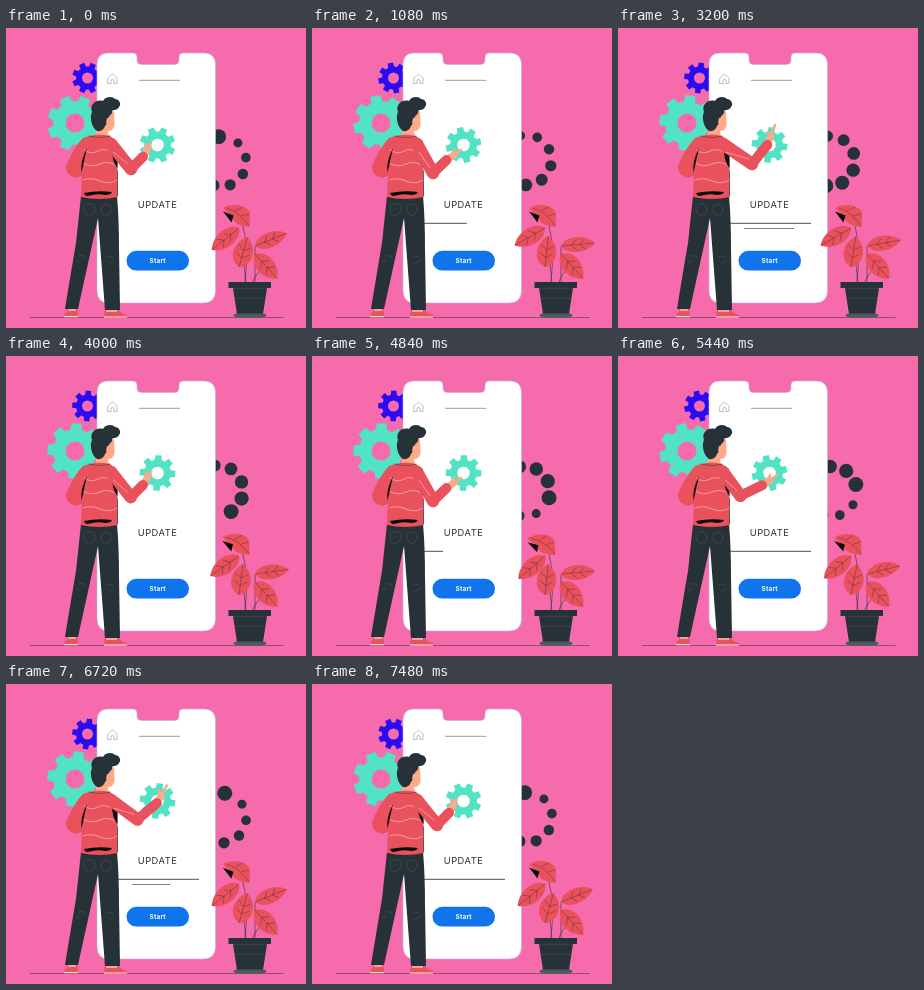
An HTML page that plays this animation: 300 px wide and 300 px high, repeating every 7720 ms.

```html
<!DOCTYPE html>
<html lang="en">
<head>
<meta charset="utf-8">
<title>Update</title>
<style>
html, body { margin: 0; height: 100%; overflow: hidden; background: #f56bab }
svg { display: block; width: 100vw; height: 100vh }
text { font-family: Inter, "Open Sans", sans-serif; text-anchor: middle }
.red { fill: #e9525c }
.dark { fill: #263238 }
.black { fill: #0b0d0e }
.skin { fill: #ffa988 }
.mint { fill: #52e3c4 }
.line { fill: none; stroke: #263238; stroke-linecap: round; stroke-linejoin: round }
.vein { fill: none; stroke: #5b2b38; stroke-width: .45 }
.sleeve { fill: none; stroke: #e9525c; stroke-linecap: round; stroke-linejoin: round }
.hand { fill: none; stroke: #ffa988; stroke-linecap: round; stroke-linejoin: round }
.stripe { fill: none; stroke: #f8b9bb; stroke-width: .7 }
</style>
</head>
<body>
<svg viewBox="0 0 300 300">
  <path id="blueGear" fill="#2b0cf2"/>
  <path id="bigGear" class="mint"/>
  <g id="ring" class="dark"></g>

  <path fill="#fff" stroke="#b9b4ef" stroke-width=".6" d="M102 25H127Q131 25 131 29V32Q131 36.500 136 36.500H168Q173 36.500 173 32V29Q173 25 177 25H198Q209.500 25 209.500 37V262Q209.500 275 197 275H103Q91 275 91 262V37Q91 25 102 25Z"/>
  <path class="line" stroke-width=".6" opacity=".5" d="M102 50L106.500 46L111 50V55.500H108V52Q106.500 50 105 52V55.500H102Z"/>
  <path stroke="#9c9fa1" d="M133 52.300H174"/>
  <path id="phoneGear" class="mint"/>
  <text x="151.500" y="179.700" font-size="9.300" letter-spacing=".5" fill="#263238">UPDATE</text>
  <rect x="120.500" y="222.800" width="62.500" height="19.700" rx="9.800" fill="#1074ec"/>
  <text x="151.700" y="234.800" font-size="6.300" letter-spacing=".25" font-weight="700" fill="#fff">Start</text>
  <path id="rule1" stroke="#4a5459"/>
  <path id="rule2" stroke="#6b7478" stroke-width=".9"/>

  <path class="line" stroke-width=".7" opacity=".7" d="M24 289.500H277"/>

  <!-- plant -->
  <path class="line" stroke-width=".7" opacity=".8" d="M240 256L238 236M249 256L249 219M246 256Q250 245 258 238M239 254Q243 220 237 198"/>
  <g id="leaves"></g>
  <g id="topLeaf">
    <path class="red" d="M217.500 180C224 175 241 176 244 185L243.500 199C235 198 229 196 226 190Z"/>
    <path class="black" d="M217 183.500L227.500 187.500L225.500 194.500Z"/>
    <path class="vein" d="M221 180Q234 184 243 198M229 183L237 179M235 188L243 186"/>
  </g>
  <path class="dark" d="M222.500 254H265V260H261L257 286H231L227 260H222.500Z"/>
  <path fill="#4c5a61" d="M230 285.500H258L261 287L258 289.500H230L227 287Z"/>
  <path fill="none" stroke="#48555c" stroke-width=".6" d="M227 260.300H261M229 270H259"/>

  <!-- person -->
  <path class="red" d="M61 280H71L72 289H58Q58 285 61 284ZM99 281H112Q115 286 121 287V289.500H98Z"/>
  <path stroke="#fff" stroke-width=".9" d="M58 288.700H72M98 289H121M62 282H70M100 283H111"/>
  <path class="dark" d="M75 168H111Q113 190 113 220L114 282H99L92 190L72 281H59Q64 250 70 215Z"/>
  <path fill="none" stroke="#4c5a61" stroke-width=".5" d="M78 178Q83 174 88 177Q91 185 83 188Q77 186 78 178M95 178Q101 174 105 178Q106 186 100 188Q94 185 95 178M72 228Q77 226 80 230M100 229Q104 226 108 231M70 234L75 232M103 235L108 233"/>
  <path class="skin" d="M96 85L108 83L108.500 94Q109 103 102 103L103 110H89L91 98Z"/>
  <path class="dark" d="M91 103C86 100 83 89 86 84C83 76 91 71 97 73C99 68 107 68 109 71C113 71 116 76 113 79C111 83 108 81 106 83C107 87 102 87 103 90C100 91 102 96 99 98Q97 104 91 103Z"/>
  <path class="skin" d="M101 90Q105 88 104 93Q102 96 100 95Z"/>
  <path class="red" d="M83 108Q94 105 104 108L111 113L112 169Q93 173 75 169L76 148L70 150Q59 147 60 138Q68 119 77 110Z"/>
  <path class="stripe" d="M78 122Q86 127 92 123T111 126M77 135Q86 140 94 136T111 138M77 152Q85 149 94 153T111 152"/>
  <path class="line" stroke-width=".5" d="M83 108Q94 111 104 108"/>
  <path class="black" d="M81 120Q74 133 75.500 145Q78 133 81 120ZM106 121Q106 134 111.500 140V125Z"/>
  <path class="black" d="M78 165Q92 162 106 164Q105 167 99 167Q91 165 82 168Q79 168 78 165Z"/>
  <path id="palm" class="hand" stroke-width="7"/>
  <path id="finger" class="hand" stroke-width="2.600"/>
  <path id="upperArm" class="sleeve" stroke-width="12.500"/>
  <path id="forearm" class="sleeve" stroke-width="10"/>
  <path id="cuff" class="stripe"/>
  <path class="line" stroke-width=".6" d="M111.500 143V167"/>
</svg>
<script>
const LOOP = 7720, LAST = 7480, CYCLE = 3860, TURN = 7000;
const $ = id => document.getElementById(id);
const draw = (id, d) => $(id).setAttribute('d', d);
const clamp = x => Math.max(0, Math.min(1, x));
const smooth = x => x * x * (3 - 2 * x);
const rad = deg => deg * Math.PI / 180;

// Each row is [time, ...values].
function pose(rows, t) {
  let i = 1;
  while (i < rows.length - 1 && rows[i][0] < t) i++;
  const a = rows[i - 1], b = rows[i];
  const k = smooth(clamp((t - a[0]) / (b[0] - a[0])));
  return a.slice(1).map((v, j) => v + (b[j + 1] - v) * k);
}

function gear(x, y, outer, root, hole, turn) {
  const pts = [];
  for (let i = 0; i < 8; i++) {
    for (const [a, r] of [[-15, root], [-10, outer], [10, outer], [15, root]]) {
      const w = rad((i + .5) * 45 + a + turn);
      pts.push((x + r * Math.cos(w)).toFixed(2) + ' ' + (y + r * Math.sin(w)).toFixed(2));
    }
  }
  return `M${pts.join('L')}ZM${x + hole} ${y}a${hole} ${hole} 0 1 0 ${-2 * hole} 0a${hole} ${hole} 0 1 0 ${2 * hole} 0Z`;
}

function leaf(x, y, len, width, angle) {
  const veins = [.3, .55].map(k =>
    `M${len * k} 0L${len * (k + .15)} ${-width * .5}M${len * k} 0L${len * (k + .15)} ${width * .5}`).join('');
  return `<g transform="translate(${x} ${y}) rotate(${angle})">
    <path class="red" d="M0 0C${len * .15} ${-width} ${len * .75} ${-width} ${len} 0C${len * .75} ${width} ${len * .15} ${width} 0 0Z"/>
    <path class="vein" d="M0 0H${len}${veins}"/></g>`;
}

const rest = [125, 141, 138, 127, 145, 115];
const armKeys = [ // elbow, wrist, fingertip
  [0, ...rest],
  [1040, 121, 145, 136, 131, 149, 122],
  [2170, 124, 134, 157, 125, 172, 115],
  [3200, 134, 136, 150, 115, 157, 97],
  [3620, ...rest],
  [CYCLE, ...rest]
];
const windKeys = [ // left leaf, right leaf, top leaf
  [0, 0, 0, 0], [1080, .6, 1, 0], [2200, 1, .5, 0], [3200, .6, .7, 0],
  [4840, -.1, 1, 1], [6000, 0, 0, .2], [LAST, 0, 0, 0]
];

function drawArm(t) {
  const [ex, ey, wx, wy, tx, ty] = pose(armKeys, t);
  const dx = tx - wx, dy = ty - wy, n = Math.hypot(dx, dy);
  const ux = dx / n, uy = dy / n;
  draw('upperArm', `M105 116L${ex} ${ey}`);
  draw('forearm', `M${ex} ${ey}L${wx - ux * 2} ${wy - uy * 2}`);
  draw('palm', `M${wx} ${wy}l${ux * 7} ${uy * 7}`);
  draw('finger', `M${wx + ux * 5} ${wy + uy * 5}L${tx} ${ty}M${wx + ux * 5} ${wy + uy * 5}l${ux * 5 + uy * 4} ${uy * 5 - ux * 4}`);
  draw('cuff', `M107 124L${ex - 3} ${ey - 5}`);
}

function drawRing(turn) {
  const cx = 213.5 + 1.7 * Math.cos(rad(turn)), cy = 133.5 + 1.9 * Math.sin(rad(turn));
  let dots = '';
  for (let i = 0; i < 9; i++) {
    const a = rad(turn - 48 + i * 39);
    dots += `<circle cx="${cx + 25 * Math.cos(a)}" cy="${cy + 25 * Math.sin(a)}" r="${4.5 + i * .37}"/>`;
  }
  $('ring').innerHTML = dots;
}

function render(time) {
  const t = Math.min(LAST, Math.floor(time % LOOP / 40) * 40);
  const p = t % CYCLE;
  const turn = 360 * clamp(t / TURN);

  draw('blueGear', gear(81.5, 50, 15.5, 11.5, 5.5, turn));
  draw('bigGear', gear(69, 95, 28, 22, 9.5, turn));
  draw('phoneGear', gear(151.5, 117, 18, 13.5, 6.3, turn));
  drawRing(-turn);

  draw('rule1', `M112 195.300h${81 * clamp((p - 900) / 340)}`);
  const second = p < 3350 ? clamp((p - 2600) / 340) : 0;
  draw('rule2', `M126 200.500h${50 * second}`);

  const [left, right, top] = pose(windKeys, t);
  $('leaves').innerHTML =
    leaf(233, 200, 35, 11, 141 + 15 * left) +
    leaf(249, 218, 34, 10, -22 + 17 * right) +
    leaf(233, 239, 31, 13, -74 - 10 * right) +
    leaf(249, 226, 33, 12, 48);
  $('topLeaf').setAttribute('transform', `rotate(${-6 * top} 243 199)`);
  drawArm(p);
}

const start = performance.now();
function tick() {
  render(performance.now() - start);
  requestAnimationFrame(tick);
}
tick();
</script>
</body>
</html>
```
